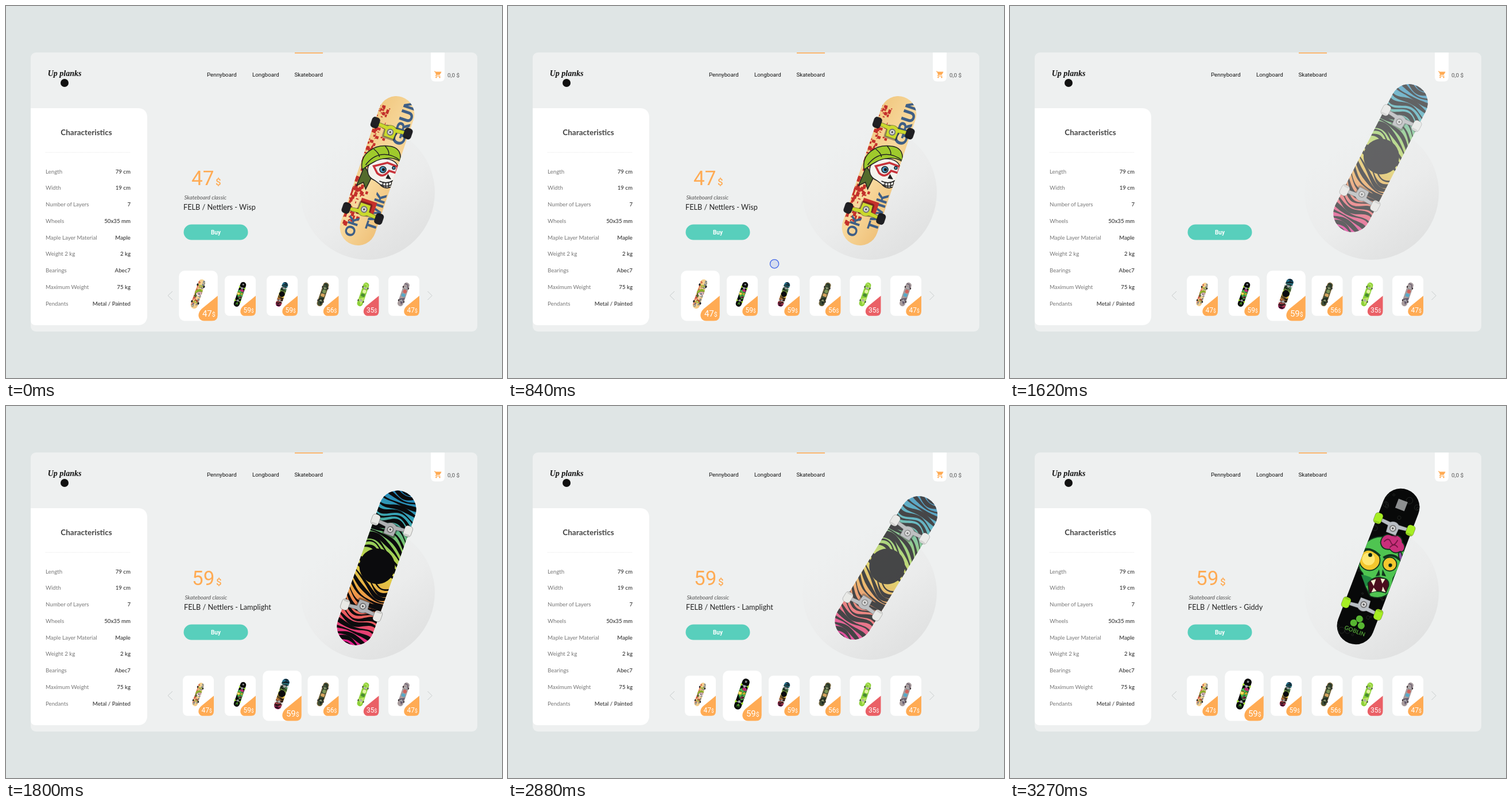
Recreate the animation shown at these times as an HTML page. Size 864 by 648 pixels, loop 3.84 s.

```html
<!DOCTYPE html>
<html lang="en">
<head>
<meta charset="utf-8">
<title>Skateboard shop</title>
<style>
  html, body { margin: 0; width: 100%; height: 100%; overflow: hidden; background: #dfe5e5; }
  svg { display: block; width: 864px; height: 648px; }
  text { font-family: Lato, sans-serif; }
  .roboto, .roboto text { font-family: Roboto, sans-serif; }
</style>
</head>
<body>
<svg id="stage" viewBox="0 0 864 648"></svg>
<script>
const LOOP = 3840, ORANGE = '#ffab54', RED = '#ea6066';

let seed = 7;
const random = () => (seed = seed * 16807 % 2147483647) / 2147483647;
const times = (n, fn) => Array.from({ length: n }, (_, i) => fn(i)).join('');
const text = (x, y, size, fill, str, attrs = '') =>
  `<text x="${x}" y="${y}" font-size="${size}" fill="${fill}" ${attrs}>${str}</text>`;
const rect = (x, y, w, h, fill, rx = 0, attrs = '') =>
  `<rect x="${x}" y="${y}" width="${w}" height="${h}" rx="${rx}" fill="${fill}" ${attrs}/>`;
const circle = (x, y, r, fill, attrs = '') =>
  `<circle cx="${x}" cy="${y}" r="${r}" fill="${fill}" ${attrs}/>`;
const path = (d, fill, attrs = '') => `<path d="${d}" fill="${fill}" ${attrs}/>`;
const gradient = (id, stops, attrs) => `<linearGradient id="${id}" ${attrs}>` +
  stops.map((c, i) => `<stop offset="${i / (stops.length - 1)}" stop-color="${c}"/>`).join('') + '</linearGradient>';

// Boards are drawn upright around their own centre.
function truck(flip, metal, wheel) {
  const wheelAt = x => rect(x, -88, 14, 19, wheel, 5, 'stroke="#0005" stroke-width=".8"') +
    rect(x + 2, -73, 10, 3, '#0002', 1.5);
  return `<g transform="scale(1 ${flip})">
    ${rect(-12, -82, 24, 24, '#0005', 4)}
    ${path('M-25-81L-8-80Q0-86 8-80L25-81V-75L10-73 9-61H-9L-10-73-25-75Z', metal, 'stroke="#3338"')}
    ${wheelAt(-37)}${wheelAt(23)}
    ${circle(0, -71, 6, '#777')}${circle(0, -71, 4, '#ddd')}${circle(0, -71, 1.8, '#555')}</g>`;
}
function board(i, length, width, fill, art, metal, wheel) {
  const deck = rect(-width / 2, -length / 2, width, length, fill, width / 2);
  return `<clipPath id="deck${i}">${deck}</clipPath><g id="board${i}">${deck}
    <g clip-path="url(#deck${i})">${art}</g>${truck(1, metal, wheel)}${truck(-1, metal, wheel)}</g>`;
}

const splatter = times(150, () => {
  const y = random() * 215 - 112;
  return rect(-32 + random() * random() * 30, y, 1 + random() * 5, 1 + random() * 7, '#c4302b');
});
const letters = (x, y, size, str) => text(0, 0, size, '#3f5f86', str,
  `font-weight="900" transform="translate(${x} ${y}) rotate(-90)"`);
const skull = `<g transform="rotate(-18.7)" stroke="#222" stroke-width="1.5">
  ${path('M-22-8L-36 26-24 20-20 32-10 12Z', '#536b2c')}
  ${path('M-8-16C10-25 34-22 37-4C38 8 30 16 28 26Q14 35 4 23L-4 17C-20 10-20-8-8-16Z', '#f4f3ee')}
  ${path('M-26-2C-32-30-4-46 20-43C36-42 43-32 40-16C28-25 8-23-6-15Q-16-10-26-2Z', '#9fca2c')}
  ${path('M-20-10C-4-32 20-34 40-18M-6-38Q4-30 4-24M14-43Q22-34 20-27', 'none')}
  ${path('M-6-8L18-14 36-7 33 4 21 0Q10 14 0 4Z', '#e9ecec', 'style="stroke:#c8323a;stroke-width:3.5"')}
  ${circle(10, -2, 5.5, '#4b9ccc')}${circle(11, -2, 2, '#111')}${circle(29, -5, 2.5, '#4b9ccc')}
  ${path('M19 7l4 7-7-1Z', '#222')}
  ${path('M4 18Q16 24 28 17M6 24Q16 30 27 23M10 20v8M15 21v9M20 20v9M25 19v8', 'none')}</g>`;
const classicArt = splatter + letters(29, -54, 30, 'GRUMB') + letters(30, 102, 25, 'TWIK') +
  letters(-2, 124, 24, 'OK') + rect(-10, 53, 28, 22, '#c4302b') + skull;

// Tapering bands that bulge around the middle of the deck.
const waves = times(30, k => {
  const base = (k - 14.5) * 10.5, upper = [], lower = [];
  for (let x = -36; x <= 36; x += 3) {
    const bulge = Math.sign(base) * 12 * Math.exp(-(x * x + base * base) / 1500);
    const y = base + bulge + x * .3 + 9 * Math.sin(x / 17 + base / 34) + 3 * Math.sin(x / 10 - base / 21);
    const half = 2.7 + 1.5 * Math.sin(x / 15 + k * 1.9);
    upper.push(x + ' ' + (y - half).toFixed(1));
    lower.unshift(x + ' ' + (y + half).toFixed(1));
  }
  return `<polygon points="${upper.concat(lower)}" fill="#0b0b0d"/>`;
});
const waveArt = waves + circle(0, -3, 31, '#0b0b0d');

const zombieHead = `<g transform="rotate(-20.9)" stroke="#10351c" stroke-width="1.8">
  ${path('M-31-25C-22-52 5-56 20-48C42-46 50-24 44-10C36 0 34 8 26 20L22 42Q8 60-14 52L-22 36-27 12C-37 2-36-14-31-25Z', '#4fc451')}
  ${path('M30 8Q24 34 12 54L22 42 28 18ZM-30 14Q-14 16-4 26L-22 35Z', '#218b42', 'stroke="none"')}
  ${path('M4-42C6-56 18-58 24-54C36-58 42-48 42-42C50-34 44-24 38-26Q28-20 20-30Q6-28 4-42Z', '#c92f7b')}
  ${path('M10-43Q18-52 22-42T34-46M20-33Q28-42 34-33', 'none', 'stroke="#761544"')}
  ${path('M39-26q6 12 3 20q-6-2-7-17Z', '#8b4ba5')}
  ${circle(-15, -11, 18, '#f4c72e')}${circle(-17, -13, 11, '#ffe874', 'stroke="none"')}${circle(-14, -20, 2.6, '#111')}
  ${circle(20, -4, 12, '#f4c72e')}${circle(21, -2, 2.3, '#111')}
  ${path('M-31-27Q-14-36 3-18M9-15Q24-25 37-12', 'none', 'stroke-width="4"')}
  ${path('M1 8l-4 8 5-1ZM8 8l4 8-5-1Z', '#173d20')}
  ${path('M-18 29Q-6 15 7 20Q20 22 18 34L13 46Q-4 40-16 47Z', '#4b0d1c')}
  ${path('M-13 25l5 9 4-12ZM4 21l3 9 5-8ZM-12 45l4-8 5 6ZM6 43l2-8 5 10Z', '#f3efd0', 'stroke="none"')}</g>`;
const zombieArt = times(45, () => circle(random() * 64 - 32, random() * 270 - 135, 1 + random() * 5,
    'none', 'stroke="#2b2f2b" stroke-width=".7"')) +
  rect(-9, -123, 17, 17, '#8d8f90') + zombieHead +
  circle(2, 97, 6, '#57b531') + circle(-5, 107, 6, '#57b531') + circle(9, 107, 6, '#57b531') +
  text(2, 123, 10, '#4f9b35', 'GOBLIN', 'text-anchor="middle" font-weight="700"');

const plainArt = (a, b, c) => circle(4, -35, 20, a) + rect(-20, -8, 42, 34, b, 8) +
  path('M-30 60L28 30 14 120Z', c) + path('M-25-115Q25-130 15-70', 'none', `stroke="${c}" stroke-width="9"`);

const boards =
  board(0, 271, 63, 'url(#wood)', classicArt, '#cad92c', '#202024') +
  board(1, 286, 65, '#080909', zombieArt, '#b9bec4', '#a6ee23') +
  board(2, 282, 65, 'url(#rainbow)', waveArt, '#aeb0b3', '#e9e9e6') +
  board(3, 275, 64, '#3e4d36', plainArt('#7e9555', '#d5a35d', '#1e2b23') +
    rect(-30, -135, 60, 270, 'none', 30, 'stroke="#bd874b" stroke-width="5"'), '#8e9c62', '#222') +
  board(4, 275, 64, '#8ed13b', plainArt('#e3f2a4', '#4a8b33', '#c4e86c'), '#d8ddd5', '#42582e') +
  board(5, 275, 64, '#a79b9c', plainArt('#cf625c', '#58a8c6', '#665d70'), '#d0d0d4', '#3a3034');

const cards = [[335, 47], [408, 59], [481, 59], [552.5, 56], [622.5, 35], [693, 47]];
const card = ([, price], i) => `<g id="card${i}" class="roboto">${rect(-27, -35, 54, 70, '#fff', 8)}
  <use href="#board${i}" transform="translate(-.5 -2.5) rotate(19) scale(.157)"/>
  ${path('M27 0L5 18C-3 25 0 35 8 35H19Q27 35 27 27Z', price < 40 ? RED : ORANGE)}
  ${text(5.5, 29, 12, '#fff', `${price}<tspan font-size="8.5">$</tspan>`)}</g>`;

const products = [
  { board: 0, x: 646.5, y: 287, angle: 18.7, left: 309, price: 47, name: 'Wisp' },
  { board: 2, x: 645.5, y: 282, angle: 19.7, left: 310, price: 59, name: 'Lamplight' },
  { board: 1, x: 641.5, y: 279.5, angle: 20.9, left: 310, price: 59, name: 'Giddy' }
];
const label = (p, i) => `<g id="label${i}" transform="translate(${p.left})" clip-path="url(#wipe)">
  <g class="roboto">${text(14, 312, 35, ORANGE, p.price)}${text(56, 312, 17, ORANGE, '$', 'font-weight="500"')}</g>
  ${text(1.5, 336.5, 9.7, '#555', 'Skateboard classic', 'font-style="italic"')}
  ${text(0, 355, 12.7, '#222', 'FELB / Nettlers - ' + p.name)}</g>`;

const specs = ['Length|79 cm', 'Width|19 cm', 'Number of Layers|7', 'Wheels|50x35 mm', 'Maple Layer Material|Maple',
  'Weight 2 kg|2 kg', 'Bearings|Abec7', 'Maximum Weight|75 kg', 'Pendants|Metal / Painted'];
const specRow = (row, i) => {
  const [key, value] = row.split('|'), y = 291.5 + i * 28.75;
  return text(69, y, 9.7, '#777', key) + text(217, y, 9.7, '#333', value, 'text-anchor="end" font-weight="500"');
};

document.getElementById('stage').innerHTML = `<defs>
  ${gradient('wood', ['#f0c77f', '#f8d99d', '#efc078'], 'x2="1" y2="1"')}
  ${gradient('rainbow', ['#1f7fb8', '#3aa6b5', '#86c95c', '#d9d848', '#eda343', '#ec5a62', '#dd1b8c'], 'x2="0" y2="1"')}
  ${gradient('disc', ['#eef0f0', '#ebecec', '#dfe0e0'], 'x1=".2" y1=".2" x2=".75" y2="1"')}
  <clipPath id="wipe"><rect id="wipeBox" x="-5" width="260"/></clipPath>${boards}</defs>
  ${rect(0, 0, 864, 648, '#dfe5e5')}${rect(43, 81, 778, 486, '#eef0f0', 9)}
  ${text(102, 122, 14, '#111', 'Up planks', 'text-anchor="middle" font-weight="700" font-style="italic" style="font-family:Liberation Serif,serif"')}
  ${circle(102, 134, 7, '#111')}
  <g class="roboto">
    ${text(350, 123, 9.75, '#111', 'Pennyboard')}${text(429, 123, 9.75, '#111', 'Longboard')}
    ${text(502.5, 123, 9.75, '#111', 'Skateboard')}${text(769, 124, 9.9, '#555', '0,0 $')}
  </g>
  ${rect(503, 81, 49, 1.6, ORANGE)}
  ${path('M740 81H764V123.500Q764 131.500 756 131.500H748Q740 131.500 740 123.500Z', '#fff')}
  <g transform="translate(745.2 112.2) scale(.6)">${circle(7, 20, 2, ORANGE)}${circle(17, 20, 2, ORANGE)}
    ${path('M1 2V4H3L6.600 11.600 5.200 14C4.500 15.400 5.500 17 7 17H19V15H7.400L8.500 13H16C16.700 13 17.400 12.600 17.700 12L21.900 5C22.300 4.300 21.800 4 21 4H5.200L4.300 2Z', ORANGE)}</g>
  ${path('M43 178H229Q246 178 246 195V539Q246 556 229 556H52Q43 556 43 547Z', '#fff')}
  ${text(140, 225, 13.5, '#444', 'Characteristics', 'text-anchor="middle" font-weight="700"')}
  ${path('M69 255H217', 'none', 'stroke="#ddd" stroke-width=".8" stroke-dasharray="1 1"')}
  ${specs.map(specRow).join('')}
  ${circle(630, 325, 117, 'url(#disc)')}
  ${products.map(label).join('')}
  ${rect(309.5, 380.5, 112, 27, '#58cfbc', 13.5)}
  ${text(365.5, 398, 10, '#fff', 'Buy', 'class="roboto" text-anchor="middle" font-weight="700"')}
  ${path('M290 497L282 504.500 290 512M734.500 497L742 504.500 734.500 512', 'none', 'stroke="#c8cccc"')}
  ${cards.map(card).join('')}
  ${products.map((p, i) => `<use id="hero${i}" href="#board${p.board}"/>`).join('')}
  ${circle(0, 0, 7.6, '#3e63e022', 'id="cursor" stroke="#4468e8" stroke-width="1.3"')}`;

const $ = id => document.getElementById(id);
const clamp = v => Math.min(1, Math.max(0, v));
const ramp = (t, start, length) => clamp((t - start) / length);
const smooth = v => v * v * (3 - 2 * v);
const show = (el, opacity) => el.setAttribute('opacity', opacity);

const swaps = [
  { grow: 1050, growFor: 270, out: 1260, wipeOut: 1380, wipeIn: 1630, enter: 1500, spin: 25, dx: 0, dy: -80 },
  { grow: 2600, growFor: 250, out: 2730, wipeOut: 2877, wipeIn: 3110, enter: 3000, spin: 38, dx: 60, dy: -195 }
];
const cursorPath = [[210, 314, 385], [720, 439, 435], [840, 464, 449], [960, 477, 471], [1100, 481, 498]];

function placeHero(i, t) {
  const p = products[i], before = swaps[i - 1], after = swaps[i];
  const rest = before ? 1 - ramp(t, before.enter, 270) : 0;
  const leave = after ? ramp(t, after.out, 270) : 0;
  const x = p.x + (before ? before.dx * rest ** 2.6 : 0) + 60 * leave ** 2.6;
  const y = p.y + (before ? before.dy * rest ** 2.6 : 0);
  const angle = p.angle + (before ? before.spin * rest ** 2 : 0) + (after ? after.spin * leave ** 2 : 0);
  const hero = $('hero' + i);
  hero.setAttribute('transform', `translate(${x} ${y}) rotate(${angle})`);
  show(hero, (1 - rest ** 1.6) * (1 - leave ** 2.3));
}

function placeLabels(t) {
  const current = swaps.filter(s => t >= s.wipeIn).length;
  const next = swaps[current], previous = swaps[current - 1];
  const top = 284 + 76 * (next ? ramp(t, next.wipeOut, 180) : 0);
  const bottom = previous ? 284 + 76 * ramp(t, previous.wipeIn, 130) : 360;
  $('wipeBox').setAttribute('y', top);
  $('wipeBox').setAttribute('height', Math.max(0, bottom - top));
  products.forEach((_, i) => show($('label' + i), +(i === current)));
}

function placeCards(t) {
  const [first, second] = swaps.map(s => smooth(ramp(t, s.grow, s.growFor)));
  const active = [1 - first, second, first - second];
  cards.forEach(([x], i) =>
    $('card' + i).setAttribute('transform', `translate(${x} 504.800) scale(${1 + .25 * (active[i] || 0)})`));
}

function placeCursor(t) {
  let x = 406, y = 503, opacity = ramp(t, 2550, 60) * (1 - ramp(t, 2640, 120));
  if (t < 2000) {
    const k = Math.max(1, cursorPath.findIndex(p => p[0] > t));
    const end = t >= 1100 ? cursorPath.length - 1 : k;
    const [t0, x0, y0] = cursorPath[end - 1], [t1, x1, y1] = cursorPath[end];
    const f = ramp(t, t0, t1 - t0);
    x = x0 + (x1 - x0) * f;
    y = y0 + (y1 - y0) * f;
    opacity = t < 210 ? 0 : 1 - ramp(t, 1140, 120);
  }
  $('cursor').setAttribute('transform', `translate(${x} ${y})`);
  show($('cursor'), opacity);
}

function frame(now) {
  const t = now % LOOP;
  products.forEach((_, i) => placeHero(i, t));
  placeLabels(t);
  placeCards(t);
  placeCursor(t);
  requestAnimationFrame(frame);
}
requestAnimationFrame(frame);
</script>
</body>
</html>
```
